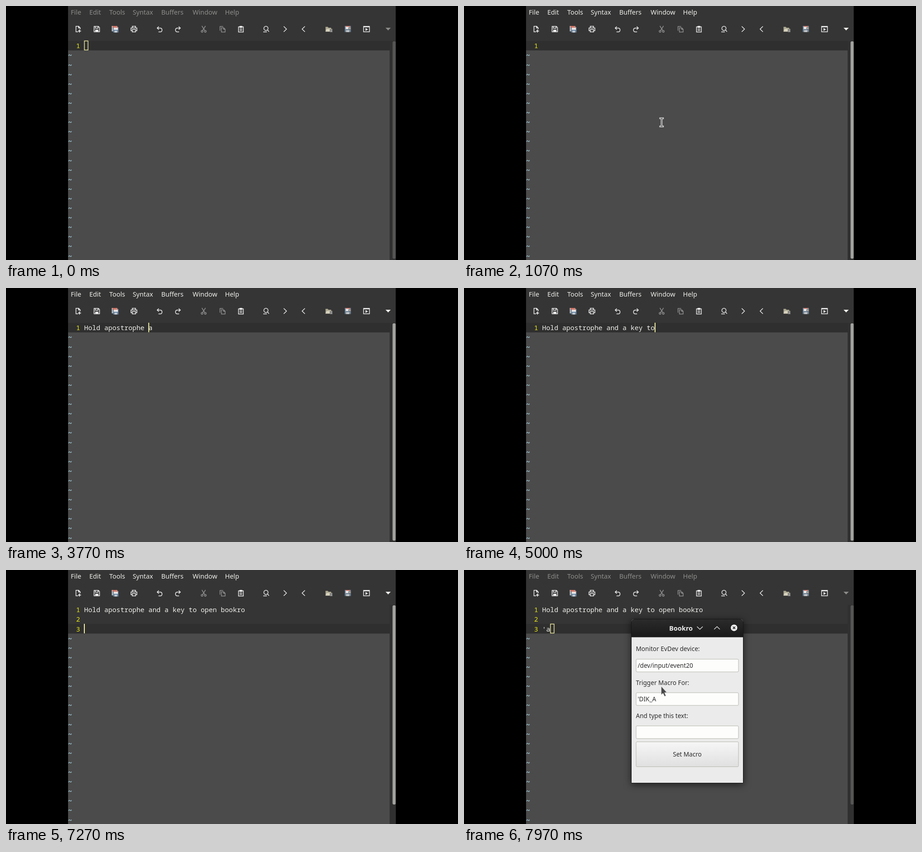
Write an HTML page that moves like this. It is 998 px wide and 561 px high and loops after 8000 ms.

```html
<!DOCTYPE html>
<html lang="en">
<head>
<meta charset="utf-8">
<title>Editor macro demo</title>
<style>
  html, body { margin: 0; width: 100%; height: 100%; overflow: hidden; background: #000; }
  svg { display: block; width: 998px; height: 561px; }
  text { font-family: "Noto Sans", sans-serif; }
  #menu { font-size: 14.4px; fill: #eeeeea; }
  #code text { font: 14.81px "Noto Sans Mono", monospace; fill: #f0f0ec; white-space: pre; }
  #code .num { fill: #e6e614; }
  #code .tilde { fill: #a9d3e0; font-weight: bold; }
  .ico { fill: none; stroke: #ececec; stroke-width: 1.5; }
  .ico .solid { fill: #ececec; stroke: none; }
  .off { stroke: #8e8e8e; }
  #dialog text { font-size: 13.6px; fill: #2c2c2c; }
  #dialog .title { font-size: 14.5px; font-weight: bold; fill: #ececec; }
  .field { fill: #fdfdfc; stroke: #b4b4ac; }
  .frame { fill: #ebebeb; stroke: #161616; filter: drop-shadow(0 3px 8px rgba(0, 0, 0, .6)); }
</style>
</head>
<body>
<svg viewBox="0 0 998 561">
  <defs>
    <linearGradient id="bar" x2="0" y2="1">
      <stop stop-color="#2b2b2b"/><stop offset="1" stop-color="#191919"/>
    </linearGradient>
    <linearGradient id="btn" x2="0" y2="1">
      <stop stop-color="#f6f6f6"/><stop offset="1" stop-color="#e0e0e0"/>
    </linearGradient>
    <clipPath id="win"><rect x="137" width="723.5" height="561"/></clipPath>
  </defs>
  <rect width="998" height="561"/>
  <g clip-path="url(#win)">
    <rect x="137" width="724" height="561" fill="#353535"/>
    <rect x="137" y="77" width="710" height="484" fill="#4b4b4b"/>
    <rect x="847" y="77" width="14" height="484" fill="#303030"/>
    <g id="menu"></g>
    <path id="more" d="M838 48h11.5l-5.75 6z" fill="#eeeeea"/>

    <g class="ico" transform="translate(159 51)">
      <path d="M0 6h-4.5v-12.2h6l3.3 3.4v3M1-6v3.5h3.5"/><path d="M3.2 1v6.6M0 4.3h6.6" stroke-width="1.8"/>
    </g>
    <g class="ico" transform="translate(200.5 51)">
      <path d="M-6-6h9.5l2.5 2.5v9.5h-12zM-3.2-6v4h6v-4"/><path class="solid" d="M-3.5 1.2h7v4.8h-7z"/>
    </g>
    <g transform="translate(241 51)">
      <path d="M-7.5-7h12v12h-12z" fill="#b9b9b9"/><path d="M-5.5-7h9v5h-9z" fill="#d66a58"/>
      <path d="M-4.5-4.5h12v12h-12z" fill="#5f7f9f"/><path d="M-3-4.5h9v6h-9z" fill="#eee"/>
      <path d="M-3-4.5h9v2h-9z" fill="#d98472"/><path d="M-1.5 3.5h6v4h-6z" fill="#ccc"/>
    </g>
    <g class="ico" transform="translate(282.5 51)">
      <path d="M-3.7-2.5v-3.7h7.4v3.7M-3.7 3.5h-2.8v-6h13v6h-2.8M-3.7 1h7.4v5.3h-7.4z"/>
    </g>
    <path id="undo" class="ico" d="M337.5 45.2l-3.7 3.5 3.7 3.5M334 48.7h6.2c5.8 0 5.8 8.6 0 8.6h-3.5"/>
    <path class="ico" d="M381.3 45.2l3.7 3.5-3.7 3.5M384.8 48.7h-6.2c-5.8 0-5.8 8.6 0 8.6h3.5"/>
    <g class="ico off" transform="translate(436.5 51)">
      <path d="M-4-7l6.5 10.5M4-7l-6.5 10.5"/><circle cx="-3.6" cy="5" r="1.9"/><circle cx="3.6" cy="5" r="1.9"/>
    </g>
    <path class="ico off" d="M472.5 54.5v-9.3h7M475.6 48.2h5.2l3 3v6.3h-8.2zM480.5 48.4v3h3"/>
    <g class="ico" transform="translate(518.7 51)">
      <path d="M-5.3-5h10.6v11.5h-10.6z"/><path class="solid" d="M-3-7h6v4.3h-6z"/>
      <path d="M-2.8 0h5.6M-2.8 3h5.6" stroke-width="1.3"/>
    </g>
    <g class="ico" transform="translate(574.5 51)">
      <circle cx="-.5" cy="-1.6" r="4.6"/><path d="M2.7 1.7l3.5 4M-6.5 6.2h8"/>
    </g>
    <path class="ico" stroke-width="1.8" d="M613.2 45l6.2 6-6.2 6M660 45l-6.2 6 6.2 6"/>
    <g transform="translate(713 51)">
      <path d="M-7.5-5h5l1.5 2h6v8.5h-12.5z" fill="#a9a58f"/><path d="M-5-.5h12.5l-2.5 6h-12.5z" fill="#d6d2bd"/>
      <path d="M2 0h6v7h-6z" fill="#666"/><path d="M3 2h4M3 5h4" stroke="#e6e6e0"/>
    </g>
    <g transform="translate(755 51)">
      <path d="M-7-7h13.5v13.5h-13.5z" fill="#6c8296"/><path d="M-5-7h9.5v7h-9.5z" fill="#e6e6e6"/>
      <path d="M-5-7h9.5v2h-9.5z" fill="#c9796d"/><path d="M-4 2.5h7v4h-7z" fill="#c8c8c8"/>
      <circle cx="4" cy="-2" r="3" fill="#777"/><circle cx="4" cy="-2" r="1.2" fill="#ddd"/>
    </g>
    <g class="ico" transform="translate(796 51)">
      <path d="M-6.5-6h13v12h-13z"/><path d="M-6.5-5h13" stroke-width="2.2"/><path class="solid" d="M-2.2-2.4l5.4 3.2-5.4 3.2z"/>
    </g>

    <rect id="slider" x="853.5" y="78" width="7" rx="3" fill="#a2a29e"/>
    <g id="code">
      <rect id="used" x="137" y="77" width="710" fill="#353535"/>
      <rect id="current" x="137" width="710" height="21" fill="#2f2f2f"/>
      <g id="rows"></g>
      <rect id="caret"/>
    </g>
    <g id="beam" fill="none" stroke-linecap="square">
      <path d="M-3-9h6M-3 9h6M0-9v18" stroke="#eee" stroke-width="3.6"/>
      <path d="M-3-9h6M-3 9h6M0-9v18" stroke="#333" stroke-width="1.2"/>
    </g>
  </g>

  <g id="dialog">
    <path class="frame" d="M369.5 470.5v-357q0-5 5-5h237q5 0 5 5v357z"/>
    <path d="M370 148.5v-35q0-4.5 4.5-4.5h237q4.5 0 4.5 4.5v35z" fill="url(#bar)"/>
    <text class="title" x="453" y="133.7">Bookro</text>
    <path d="M514.5 125l6.3 6 6.3-6M552.3 131l6.3-6 6.3 6" fill="none" stroke="#dcdcdc" stroke-width="1.5"/>
    <circle cx="596.3" cy="127.7" r="7.2" fill="#f2f2f2"/>
    <path d="M593.6 125l5.4 5.4m0-5.4l-5.4 5.4" stroke="#222" stroke-width="1.6"/>
    <text x="379.5" y="179.3">Monitor EvDev device:</text>
    <rect class="field" x="380" y="197" width="226" height="28" rx="2"/>
    <text x="383.5" y="216">/dev/input/event20</text>
    <text x="379.5" y="253.6">Trigger Macro For:</text>
    <rect class="field" x="380" y="271" width="226" height="28" rx="2"/>
    <text x="383.5" y="290">'DIK_A</text>
    <text x="379.5" y="327">And type this text:</text>
    <rect class="field" x="380" y="344.3" width="226" height="28" rx="2"/>
    <rect x="380" y="379.5" width="226" height="55" rx="2" fill="url(#btn)" stroke="#b4b4ac"/>
    <text x="493" y="412.3" text-anchor="middle">Set Macro</text>
    <path d="M615 461l-8 8M615 465l-4 4" stroke="#d2d2d2" stroke-dasharray="1.5 1.5"/>
    <path d="M435.5 257v18.5l4-3.4 3.3 7 3-1.4-3.2-6.8 5.2-.4z" fill="#484848" stroke="#dadada" stroke-width=".8"/>
  </g>
</svg>
<script>
const LOOP = 8000, LEFT = 137, TOP = 77, ROW = 21.1, COL = 8.888, TEXT_X = 172.5;
const FOCUS = 370, INSERT = 1630, POPUP = 7630, BLUR = 7770, LAG = 30;
const $ = id => document.getElementById(id);
const clamp = v => Math.max(0, Math.min(1, v));

function make(parent, tag, attrs, text = '') {
  const el = document.createElementNS('http://www.w3.org/2000/svg', tag);
  set(el, attrs);
  el.textContent = text;
  return parent.appendChild(el);
}
function set(el, attrs) {
  for (const k in attrs) el.setAttribute(k, attrs[k]);
}

// typing bursts: start, text, ms per key
const bursts = [
  [1730, 'Hold ap', 111], [2470, 'ostrophe ', 87.5], [3770, 'and a ke', 104],
  [4670, 'y to', 100], [5070, ' open', 92.5], [5500, ' ', 0], [5800, 'bookro', 108],
  [7030, '\n', 0], [7150, '\n', 0], [7300, "'", 0], [7730, 'a', 0]
];
const keys = bursts.flatMap(([start, text, step]) =>
  [...text].map((ch, i) => ({ ch, at: start + i * step })));
const typedAt = t => keys.filter(k => k.at <= t).map(k => k.ch).join('').split('\n');

const labels = [['File', 143], ['Edit', 184], ['Tools', 228], ['Syntax', 279.7],
  ['Buffers', 342.7], ['Window', 412], ['Help', 483.5]];
for (const [name, x] of labels) make($('menu'), 'text', { x, y: 19 }, name);

const rows = Array.from({ length: 23 }, (_, i) => {
  const y = 93.3 + i * ROW;
  return {
    tilde: make($('rows'), 'text', { class: 'tilde', x: LEFT, y }, '~'),
    num: make($('rows'), 'text', { class: 'num', x: TEXT_X - 2 * COL, y }, i + 1),
    line: make($('rows'), 'text', { x: TEXT_X, y })
  };
});

function drawCaret(t, lines) {
  const x = TEXT_X + lines.at(-1).length * COL, y = TOP + (lines.length - 1) * ROW;
  const color = '#f3f0a4';
  if (t < FOCUS || t >= BLUR) {
    set($('caret'), { x: x + .6, y: y + .2, width: 8, height: 20, fill: 'none', stroke: color, 'stroke-width': 1.4 });
  } else {
    const width = t < INSERT ? COL : 2;
    set($('caret'), { x: x - .5, y: y - .3, width, height: 21, fill: color, stroke: 'none' });
  }
  $('caret').style.opacity = t >= 1070 && t < 1330 ? 0 : 1;
}

function draw(t) {
  const lines = typedAt(t), n = lines.length;
  rows.forEach((r, i) => {
    r.tilde.style.display = i < n ? 'none' : '';
    r.num.style.display = i < n ? '' : 'none';
    r.line.textContent = lines[i] || '';
  });
  const behind = typedAt(t - LAG);
  set($('used'), { height: n * ROW });
  set($('current'), { y: TOP + (behind.length - 1) * ROW });
  set($('slider'), { height: 480 - 20 * (n - 1) });
  drawCaret(t, behind);

  const focus = clamp((t - FOCUS) / 230) - clamp((t - BLUR) / 200);
  $('menu').style.opacity = $('more').style.opacity = .47 + .53 * focus;
  $('slider').style.opacity = .33 + .67 * focus;

  const left = (1 - clamp((t - 30) / 340)) ** 2;
  set($('beam'), { transform: `translate(${436.3 + 34 * left} ${257 + 320 * left})` });
  $('beam').style.display = t >= 30 && t < INSERT ? '' : 'none';

  $('dialog').style.opacity = t < POPUP ? 0 : clamp(.25 + (t - POPUP) / 130);
}

const begin = performance.now();
function tick() {
  draw((performance.now() - begin) % LOOP);
  requestAnimationFrame(tick);
}
tick();
</script>
</body>
</html>
```
